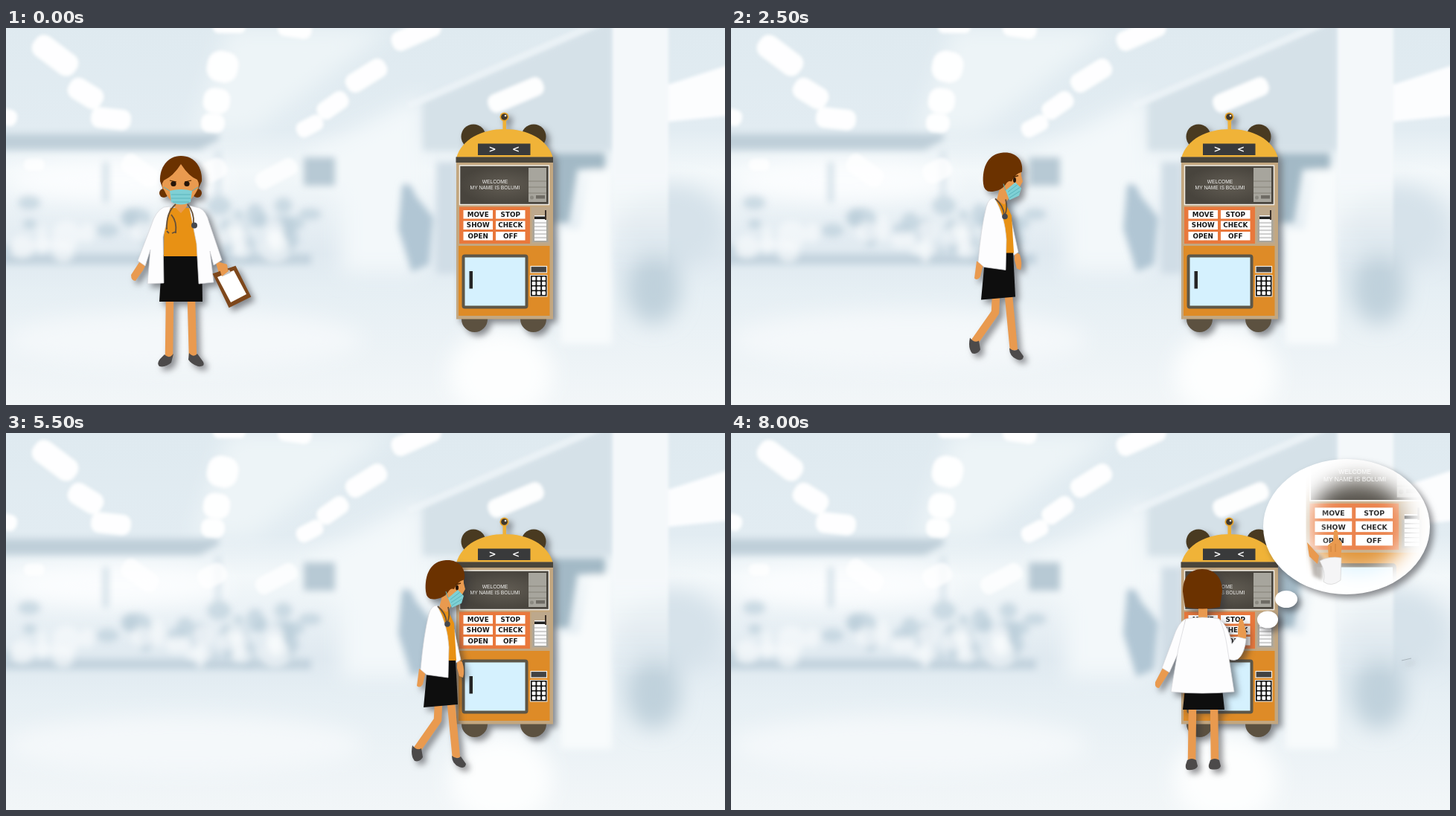
Recreate the animation shown at these times as an HTML page. Size 966 px wide and 507 px high, loop 8.5 s.

```html
<!DOCTYPE html>
<html lang="en">
<head>
<meta charset="utf-8">
<title>Nurse and robot</title>
<style>
html, body { margin: 0; width: 100%; height: 100%; overflow: hidden; background: #eef4f8; }
svg { display: block; width: 966px; height: 507px; }
.hide { display: none; }
.shade { filter: drop-shadow(5px 5px 4px rgba(50, 50, 55, .55)); }
.skin { fill: #e99a4f; }
.hair { fill: #6b3200; }
.coat { fill: #fdfdfe; stroke: #d5d5d8; stroke-width: .7; }
.top { fill: #e89114; }
.skirt { fill: #0e0e0e; }
.shoe { fill: #4c4a4a; }
.mask { fill: #7fd0d5; }
.pleat { fill: none; stroke: #5bb4bb; stroke-width: 1; }
.leg { fill: none; stroke: #e99a4f; stroke-width: 10.5; stroke-linejoin: round; }
.cord { fill: none; stroke: #65503a; stroke-width: 1.8; }
.label { font: bold var(--label, 8.8px) "DejaVu Sans", sans-serif; text-anchor: middle; dominant-baseline: central; fill: #161616; }
.screen { font: 6.7px "Liberation Sans", Arial, sans-serif; text-anchor: middle; fill: #f2f2f0; }
.zoom { --label: 7.4px; }
</style>
</head>
<body>
<svg viewBox="0 0 966 507">
<defs>
  <linearGradient id="room" x2="0" y2="1">
    <stop offset="0" stop-color="#dfeaf0"/><stop offset=".27" stop-color="#e2ecf2"/>
    <stop offset=".38" stop-color="#f3f8fa"/><stop offset=".6" stop-color="#dfe9f0"/>
    <stop offset=".7" stop-color="#e6eff4"/><stop offset="1" stop-color="#f2f6f8"/>
  </linearGradient>
  <linearGradient id="pillar" x2="0" y2="1">
    <stop offset="0" stop-color="#f4f8fa"/><stop offset=".6" stop-color="#f4f8fa"/>
    <stop offset="1" stop-color="#f4f8fa" stop-opacity="0"/>
  </linearGradient>
  <radialGradient id="glass"><stop offset="0" stop-color="#625d54"/><stop offset="1" stop-color="#48443d"/></radialGradient>
  <filter id="b2" x="-30%" y="-30%" width="160%" height="160%"><feGaussianBlur stdDeviation="2"/></filter>
  <filter id="b5" x="-30%" y="-30%" width="160%" height="160%"><feGaussianBlur stdDeviation="5"/></filter>
  <filter id="b14" x="-50%" y="-50%" width="200%" height="200%"><feGaussianBlur stdDeviation="14"/></filter>
  <mask id="fade" maskUnits="userSpaceOnUse" x="710" y="30" width="240" height="200">
    <ellipse cx="843" cy="124" rx="66" ry="62" fill="#e8e8e8" filter="url(#b14)"/>
  </mask>
  <clipPath id="oval"><ellipse cx="827" cy="126" rx="112" ry="91"/></clipPath>
</defs>

<g id="hall">
  <rect width="966" height="507" fill="url(#room)"/>
  <g filter="url(#b14)">
    <path d="M300 0H520L330 140H250Z" fill="#edf4f7"/>
    <path d="M400 170L560 90V330H450V230Z" fill="#f3f8fa"/>
    <ellipse cx="150" cy="205" rx="150" ry="28" fill="#fbfdfe"/>
    <ellipse cx="665" cy="465" rx="70" ry="60" fill="#fdfefe"/>
    <ellipse cx="240" cy="420" rx="240" ry="40" fill="#f4f8fa"/>
    <ellipse cx="895" cy="265" rx="70" ry="55" fill="#d6e2ea"/>
    <ellipse cx="870" cy="350" rx="36" ry="48" fill="#c0d1dc"/>
  </g>
  <g filter="url(#b5)">
    <path d="M-20 142H286V150L260 164H-20Z" fill="#bfcfd9"/>
    <path d="M560 100L815 -10V165H560Z" fill="#d5e1e8"/>
    <path d="M400 174H442V212H400Z" fill="#b7c9d4"/>
    <path d="M130 180H138V235H130ZM282 165H288V230H282Z" fill="#d3e0e8"/>
    <path d="M-10 304H410V318H-10Z" fill="#c3d3de"/>
    <path d="M735 168H805V190H768L756 262H735Z" fill="#a3b9c6"/>
    <path d="M532 212Q543 204 550 225L574 255L568 318L545 328L527 270Z" fill="#b1c6d4"/>
    <path d="M578 180H606V330H578Z" fill="#d0dde6"/>
    <path d="M784 190H814V425H745V270H770Z" fill="#f8fbfc"/>
  </g>
  <g id="crowd" filter="url(#b5)"></g>
  <g filter="url(#b2)">
    <path d="M540 105L800 -8" stroke="#f0f5f8" stroke-width="9" opacity=".7"/>
    <path d="M815 -5H890V330H815Z" fill="url(#pillar)"/>
    <path d="M890 76L970 50V118L890 126Z" fill="#fcfdfe"/>
  </g>
  <g id="lamps" filter="url(#b2)"></g>
</g>

<g class="shade">
<g id="robot">
  <g fill="#493a21"><circle cx="628" cy="146" r="16.5"/><circle cx="709" cy="146" r="16.5"/></g>
  <g fill="#5c5140"><circle cx="629.5" cy="391.5" r="17.5"/><circle cx="708.5" cy="391.5" r="17.5"/></g>
  <path d="M667.5 122H672V140H667.5Z" fill="#efb137"/>
  <circle cx="669.5" cy="119.5" r="6" fill="#e7a52d"/><circle cx="669.5" cy="119.5" r="4.3" fill="#40382c"/>
  <circle cx="671" cy="118" r="1.3" fill="#eee"/>
  <path d="M605 175C612 149 640 136 670 136S728 149 735 175Z" fill="#f0b338"/>
  <rect x="634" y="155.5" width="70.5" height="15.5" fill="#393a3b"/>
  <g font-family="DejaVu Sans, sans-serif" font-weight="bold" font-size="12" fill="#fff" text-anchor="middle"><text x="653.5" y="167">&gt;</text><text x="685" y="167">&lt;</text></g>
  <rect x="605" y="173.5" width="130" height="218" fill="#c3a780"/>
  <rect x="604.5" y="173.5" width="130.5" height="7.5" fill="#4a453b"/>
  <rect x="609.5" y="185" width="120" height="52.5" fill="url(#glass)" stroke="#f2efe8" stroke-width="1.5"/>
  <text class="screen" x="657" y="209">WELCOME</text><text class="screen" x="657" y="217">MY NAME IS BOLUMI</text>
  <rect x="702" y="188" width="24" height="46" fill="#a7a59d"/>
  <path d="M702 206H726M702 214H726M702 222H726" stroke="#858279"/>
  <rect x="712" y="225" width="12" height="4.5" fill="#6e6b64"/><circle cx="706.5" cy="228" r="2.5" fill="#8b8981"/>
  <rect x="609" y="240.5" width="95" height="49.5" fill="#e9783c"/>
  <g id="keys"></g>
  <rect x="706" y="241" width="25" height="49" fill="#bda88c"/>
  <rect x="707.5" y="258" width="21" height="30" fill="#aaa69c"/>
  <rect x="710" y="252" width="16" height="34" fill="#fafafa"/>
  <path d="M710 253.5H726V257H710Z" fill="#222"/>
  <path d="M725 245V258" stroke="#3a3028" stroke-width="2"/>
  <path d="M710 262H726M710 267H726M710 272H726M710 277H726M710 282H726" stroke="#9a9a9a" stroke-width=".9"/>
  <rect x="608" y="293" width="122.5" height="94" fill="#de8b27"/>
  <rect x="614.5" y="306.5" width="85" height="69" rx="2" fill="#d5f1fe" stroke="#5d5647" stroke-width="4"/>
  <rect x="622.5" y="327" width="4.5" height="23.5" fill="#252525"/>
  <rect x="705" y="320.5" width="21.5" height="8.5" fill="#424242" stroke="#f1eee8" stroke-width="1.2"/>
  <rect x="704.5" y="332.5" width="22.5" height="28.5" fill="#151515" stroke="#eee"/>
  <g id="pad" fill="#fff"></g>
</g>
</g>

<g id="front" class="shade">
  <path class="leg" d="M220 366L219 443M249 366L251 442"/>
  <path class="shoe" d="M213 439Q219 446 225 438L222 450Q214 457 206 455Q202 451 207 445ZM246 437Q252 444 257 438L265 449Q268 456 258 455Q249 452 245 446Z"/>
  <path class="skin" d="M181 312L168 332Q168 340 174 340L184 326L189 316ZM281 313L287 333L299 330L297 318Z"/>
  <path class="skirt" d="M210 305H263L264 368H206Z"/>
  <path class="top" d="M213 242H257V307H212Z"/>
  <path class="skin" d="M228 231H243V240L235 249L226 240Z"/>
  <path class="coat" d="M212 241L221 240L211 281L212 343L190 344L194 298L187 320L177 313L195 266Q201 246 212 241ZM246 239L260 242Q269 246 273 262L290 312L279 319L274 300L279 342L259 344L256 290Z"/>
  <path class="cord" d="M228 237Q215 248 216 271M222 251Q230 260 228 276M244 237Q253 248 252 263M216 273l3 3M228 274l-5 2"/>
  <circle cx="253" cy="265.5" r="4" fill="#45484e"/>
  <circle class="hair" cx="212" cy="222" r="6"/><circle class="hair" cx="257" cy="222" r="6"/>
  <path class="hair" d="M235 172C254 172 264 188 263 206L258 217H211L207 206C206 188 217 172 235 172Z"/>
  <path class="skin" d="M235 183Q246 200 257 204Q261 211 257 218Q248 236 235 236Q220 236 213 219Q207 212 212 205Q225 199 235 183Z"/>
  <path d="M220 205L229 207M249 205L240 207" stroke="#4f2600" stroke-width="1.2"/>
  <circle cx="225" cy="209.5" r="3.6" fill="#241409"/><circle cx="243" cy="209.5" r="3.6" fill="#241409"/>
  <path class="mask" d="M220 219Q235 215 250 219L248 234Q235 241 222 234Z"/>
  <path class="pleat" d="M222 224H248M222 229H248M224 234H246M220 219L212 214M250 219L258 214"/>
  <path d="M279 331L308 321L328 361L300 375Z" fill="#7e471b" stroke="#7e471b" stroke-width="2"/>
  <path d="M284 335L306 326L323 358L302 369Z" fill="#fff"/>
  <path d="M289 330l11 -5l2 4l-11 5Z" fill="#c3c3c3"/><path class="skin" d="M285 318l10 -1l4 10l-9 7Z"/>
</g>

<g id="side" class="shade hide">
  <g data-pose="A">
    <path class="leg" d="M280 364L273 434M299 364L304 381L298 431"/>
    <path class="shoe" d="M266 429Q272 436 278 431L283 443Q280 450 273 447Q264 442 264 434ZM292 428Q298 434 303 429L309 442Q306 448 298 445Q289 440 290 432Z"/>
  </g>
  <g data-pose="B">
    <path class="leg" d="M286 364L285 386L257 426M303 364L310 437"/>
    <path class="shoe" d="M251 420Q257 428 263 424L265 436Q261 443 254 441Q248 434 251 420ZM304 434Q311 440 316 435L323 445Q322 452 314 449Q304 445 304 434Z"/>
  </g>
  <g data-pose="C">
    <path class="leg" d="M296 364L298 437M282 364L284 442"/>
    <path class="shoe" d="M293 432Q298 438 303 432L312 443Q311 449 302 447Q293 442 293 432ZM278 438Q284 444 289 439L297 449Q295 455 287 453Q277 447 278 438Z"/>
  </g>
  <path class="skin" d="M311 304L318 308Q322 320 319 329L314 327L311 316ZM260 317L269 321L265 338Q261 344 257 340Z"/>
  <path class="coat" d="M307 264L316 305L310 309L306 290Z"/>
  <path class="skirt" d="M272 305H309L312 365L266 369Z"/>
  <path class="top" d="M284 236L297 235L307 256L310 306H292Z"/>
  <path class="skin" d="M291 219H305V230L297 241L287 235Z"/>
  <path class="coat" d="M284 232Q276 232 273 244Q266 272 262 318L270 325L299 329L300 288Q298 256 284 232Z"/>
  <path class="cord" d="M285 233Q296 242 297 255M299 234Q302 245 298 255"/>
  <circle cx="298" cy="257" r="3.8" fill="#45484e"/>
  <path class="skin" d="M305 184L319 181L320 202L322 210L317 219L300 230L294 215Z"/>
  <path class="hair" d="M296 171C313 170 323 181 321 197L316 199Q310 203 307 210Q302 208 299 214Q293 222 284 223Q270 226 269 213C267 190 276 172 296 171Z"/>
  <ellipse cx="311" cy="208" rx="2" ry="3.4" fill="#241409"/><path d="M309 204L316 202" stroke="#4f2600" stroke-width="1.5"/>
  <path class="mask" d="M299 222L312 211L320 219L317 229L304 235Z"/>
  <path class="pleat" d="M302 224L315 214M303 228L318 218M304 232L318 223M299 222L296 213"/>
</g>

<g id="back" class="shade hide">
  <path class="leg" d="M620 368L619 443M649 368L650 443"/>
  <path class="shoe" d="M613 440Q619 436 625 440L627 448Q625 454 613 453Q610 451 611 446ZM644 440Q650 436 656 440L658 448Q656 454 644 452Q641 450 642 446Z"/>
  <path class="skin" d="M580 316L570 335Q569 343 575 343L586 326L590 319ZM681 279L681 264L683 251Q686 247 688 252L690 260Q694 268 691 279ZM628 232H640V252H628Z"/>
  <path class="skirt" d="M610 344H660L663 372H607Z"/>
  <path class="coat" d="M611 250Q601 254 594 276L579 316L589 322L602 293ZM655 250Q668 258 673 284L680 274L692 277Q690 297 681 304Q671 309 662 298Z"/>
  <path class="coat" d="M611 250Q633 246 656 250Q663 263 667 290L676 348Q633 352 591 348L601 290Z"/>
  <path class="hair" d="M633 183C650 183 660 195 660 213L657 234Q633 239 610 234L607 213C607 195 616 183 633 183Z"/>
</g>

<g id="bubble" class="shade">
  <ellipse id="dot1" cx="721" cy="251" rx="14" ry="11.5" fill="#fff"/>
  <ellipse id="dot2" cx="746" cy="223.5" rx="15" ry="11.5" fill="#fff"/>
  <g id="cloud">
    <ellipse cx="827" cy="126" rx="112" ry="91" fill="#fff"/>
    <g clip-path="url(#oval)">
      <g mask="url(#fade)"><use class="zoom" href="#robot" transform="translate(10.2 -208.3) scale(1.26)"/></g>
      <path d="M776 152L796 168L794 198L782 192Z" fill="#8d847c" opacity=".55" filter="url(#b2)"/>
      <path class="skin" d="M774 147L790 165L788 176L777 166ZM803 171L802 151L809 145L810 132Q812 128 815 132L816 142L821 148L819 170Z"/>
      <path d="M806 152V160M812 149V160" stroke="#c97d38" stroke-width=".9"/>
      <path d="M791 172Q804 165 820 168L819 198Q806 208 796 200Q800 188 791 172Z" fill="#f5f5f6" stroke="#d3d3d3" stroke-width=".7"/>
    </g>
    <path d="M901 306L914 303" stroke="#a8b3ba"/>
  </g>
</g>
</svg>
<script>
const $ = id => document.getElementById(id);
const SVG = 'http://www.w3.org/2000/svg';

function add(parent, tag, attrs, text) {
  const el = document.createElementNS(SVG, tag);
  for (const k in attrs) el.setAttribute(k, attrs[k]);
  if (text) el.textContent = text;
  return $(parent).appendChild(el);
}

// x, y, width, height, angle
[[66, 37, 68, 32, 37], [107, 88, 50, 30, 32], [141, 122, 54, 28, 6], [291, 52, 42, 42, 12],
 [283, 98, 36, 34, 8], [278, 128, 32, 25, 5], [484, 64, 60, 27, -32], [439, 104, 46, 25, -35],
 [408, 132, 38, 22, -28], [551, 8, 70, 27, -24], [388, 1, 46, 24, 8], [300, -2, 44, 18, 0],
 [685, 90, 79, 26, -23], [2, 120, 26, 22, 15], [180, 192, 55, 27, 35], [277, 192, 40, 28, -25],
 [363, 196, 60, 24, -28], [38, 184, 28, 16, 0]
].forEach(([x, y, w, h, a]) => add('lamps', 'rect', {
  x: x - w / 2, y: y - h / 2, width: w, height: h, rx: h * .42, fill: '#fff',
  opacity: y > 170 ? .75 : .95, transform: `rotate(${a} ${x} ${y})`
}));

// blurred people: dark heads and bodies above a row of pale seats
let seed = 7;
const rnd = () => (seed = seed * 16807 % 2147483647) / 2147483647;
for (let i = 0; i < 48; i++) {
  const seat = i >= 28;
  add('crowd', 'ellipse', {
    cx: rnd() * 410, cy: (seat ? 268 : 235) + rnd() * (seat ? 34 : 70), rx: 7 + rnd() * 13, ry: 6 + rnd() * 14,
    fill: seat ? '#f7fafc' : '#b9ccd9', opacity: .65
  });
}

['MOVE', 'STOP', 'SHOW', 'CHECK', 'OPEN', 'OFF'].forEach((word, i) => {
  const x = 614.5 + i % 2 * 43.5, y = 245 + (i >> 1) * 14.5;
  add('keys', 'rect', { x, y, width: 39.5, height: 11.5, fill: '#fff' });
  add('keys', 'text', { class: 'label', x: x + 19.75, y: y + 5.9 }, word);
});
for (let i = 0; i < 12; i++) add('pad', 'rect', {
  x: 706.7 + i % 3 * 6.7, y: 334.6 + (i / 3 | 0) * 6.5, width: 4.8, height: 4.8, rx: 1
});

const STEP = 500, STEPS = 17, BACK = 12;
const walkX = [0, -72, -36, 0, 35, 70, 105, 140, 181, 221, 258, 295];
const walkY = [0, 1, -2, 0, 0, -3.5, 1, 3, 0, 3, 3, 0];
const poses = [...document.querySelectorAll('[data-pose]')];
const show = (el, on) => el.classList.toggle('hide', !on);
let last = -1;

function draw() {
  const k = Math.floor(performance.now() / STEP) % STEPS;
  if (k !== last) {
    const walking = k > 0 && k < BACK;
    show($('front'), k === 0);
    show($('side'), walking);
    show($('back'), k >= BACK);
    if (walking) {
      $('side').setAttribute('transform', `translate(${walkX[k]} ${walkY[k]})`);
      poses.forEach(p => show(p, p.dataset.pose === 'ACB'[k % 3]));
    }
    show($('dot1'), k >= 14);
    show($('dot2'), k >= 15);
    show($('cloud'), k >= 16);
    last = k;
  }
  requestAnimationFrame(draw);
}
draw();
</script>
</body>
</html>
```
